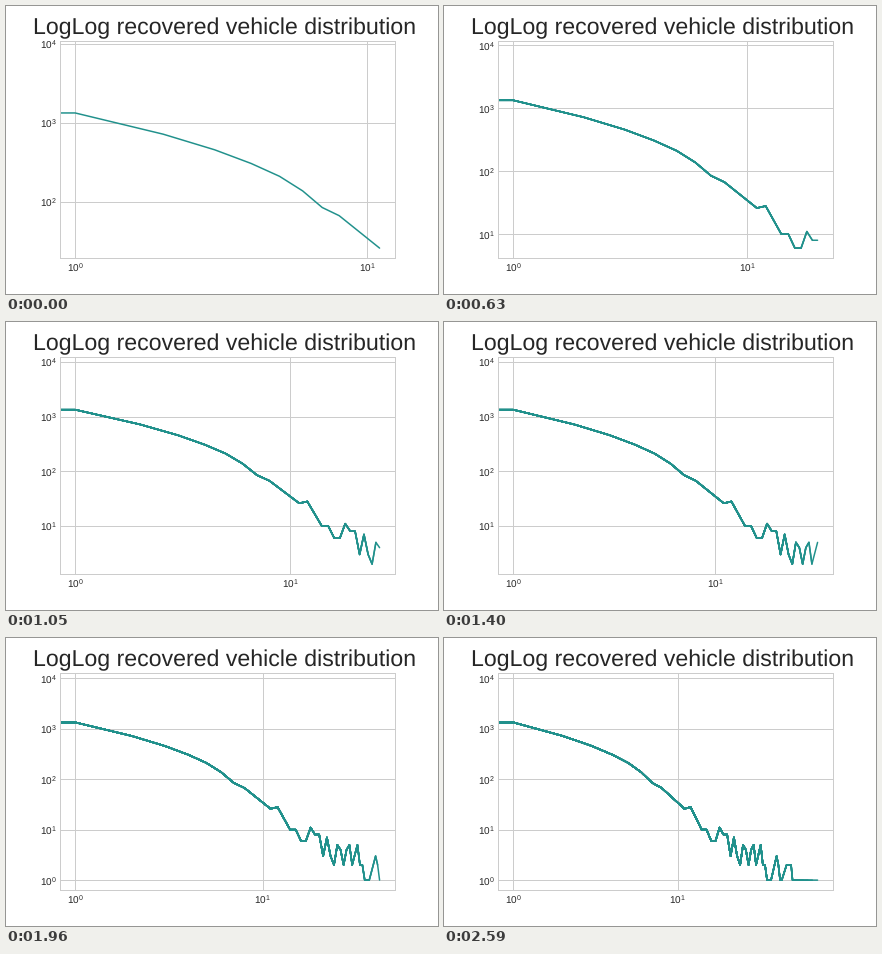
A matplotlib script that plays this animation: 432x288 px, repeating every 3.36 s.

```python
import matplotlib.pyplot as plt
from matplotlib.animation import FuncAnimation
from matplotlib.ticker import NullFormatter
import numpy as np

W, H, DPI = 432, 288, 72
STEP_MS, FRAMES = 70, 48
FIRST = 12          # points visible at the start
MARGIN = 0.05       # log-space padding around the data
TEAL, GREY, INK = "#21918c", "0.8", "0.15"

plt.rcParams.update({
    "font.family": "Liberation Sans",
    "font.size": 10,
    "text.hinting": "none",
    "text.color": INK,
    "axes.edgecolor": GREY,
    "axes.linewidth": 1,
    "axes.axisbelow": True,
    "grid.color": GREY,
    "grid.linewidth": 1,
    "lines.solid_capstyle": "round",
})

# Bends of the middle stretch as (size, count).
BENDS = [(6, 138), (7, 85), (8, 67), (11, 26), (12, 28), (14, 10), (15, 10),
         (16, 6), (17, 6), (18, 11), (19, 8), (20, 8)]


def count(size):
    """Vehicles of one size: smooth decay, bends, then fading ripples."""
    if size == 0:
        return 8300
    if size < 6:
        return 1340 * size ** -(0.723 + 0.085 * size)
    if size <= 20:
        xs, ys = np.log(BENDS).T
        return np.exp(np.interp(np.log(size), xs, ys))
    if size < 35:
        wave = 0.28 * np.cos(0.6 * np.pi * (size - 22))
        return round(10 ** (0.545 - 0.008 * (size - 21) + wave))
    if size <= 50:
        return round(1.6 + np.cos(2 * np.pi * (size - 39.9) / 7.75))
    return 1


# Large sizes are increasingly sparse.
sizes = np.r_[0:31, 32:38, 40:44, 46, 49, np.geomspace(50, 71, 6).round()]
counts = np.array([count(s) for s in sizes])

fig = plt.figure(figsize=(W / DPI, H / DPI), dpi=DPI, facecolor="white")
ax = fig.add_axes([0.125, 0.125, 0.775, 0.755])
ax.set_xscale("log")
ax.set_yscale("log")
ax.grid(True)
ax.tick_params(which="both", length=0, pad=3.5, labelcolor=INK)
for axis in (ax.xaxis, ax.yaxis):
    axis.set_minor_formatter(NullFormatter())

fig.text(27 / W, 1 - 28.56 / H, "LogLog recovered vehicle distribution",
         fontsize=23.1, ha="left", va="baseline")

# Every step adds a longer copy of the curve over the earlier ones.
curves = [ax.plot(sizes[:n], counts[:n], color=TEAL, lw=1.5)[0]
          for n in range(FIRST, len(sizes) + 1)]


def padded(low, high):
    a, b = np.log10([low, high])
    pad = MARGIN * (b - a)
    return 10 ** (a - pad), 10 ** (b + pad)


def update(frame):
    step = min(frame, len(curves) - 1)
    for i, curve in enumerate(curves):
        curve.set_visible(i <= step)
    n = FIRST + step
    ax.set_xlim(*padded(1, sizes[n - 1]))
    ax.set_ylim(*padded(counts[:n].min(), counts[:n].max()))
    return curves


anim = FuncAnimation(fig, update, frames=FRAMES, init_func=lambda: curves,
                     interval=STEP_MS, repeat=True, repeat_delay=0, blit=False)
plt.show()
```
